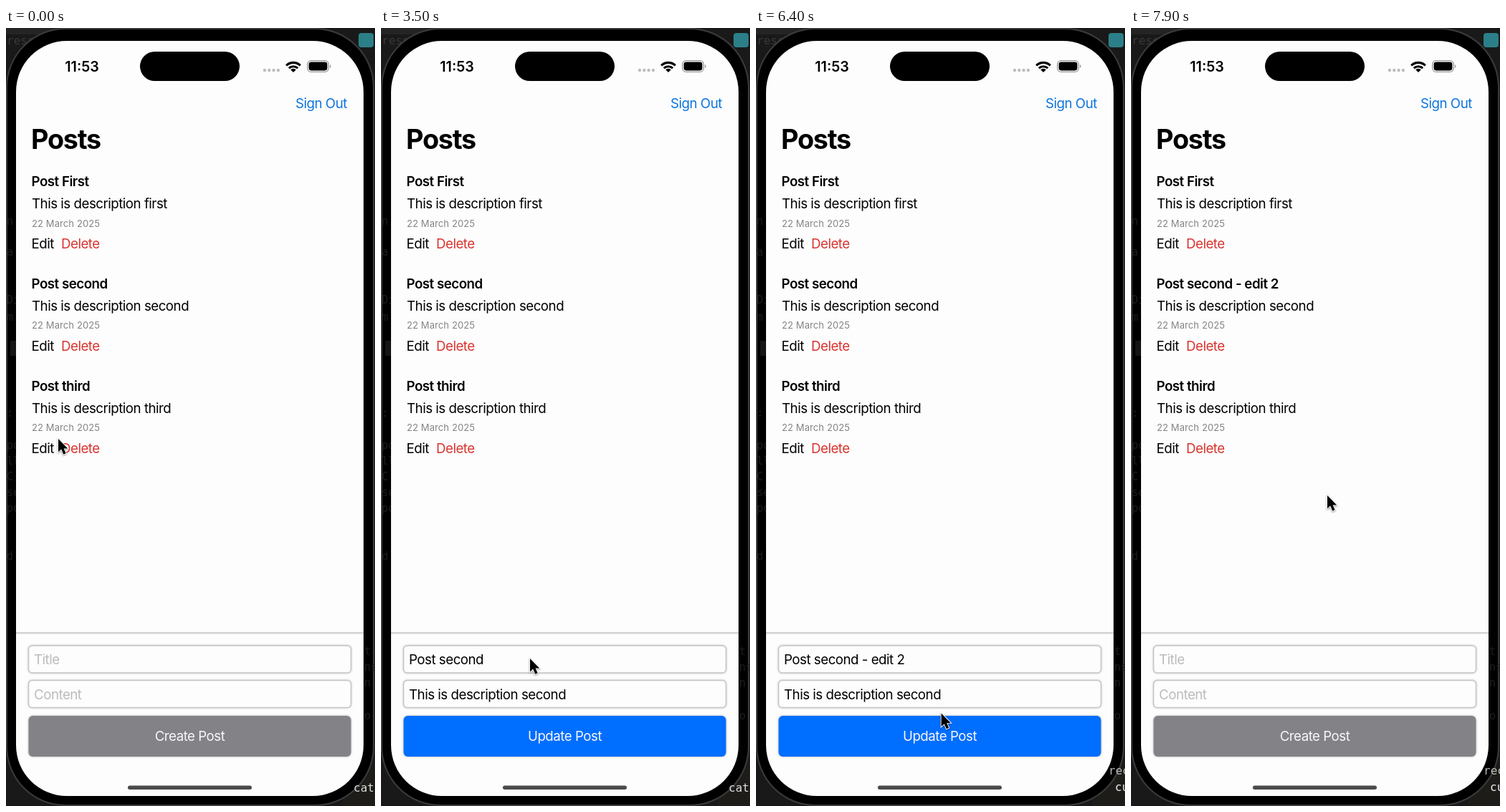
An HTML page that plays this animation: 515 px wide and 1087 px high, repeating every 8 s.

```html
<!DOCTYPE html>
<html lang="en">
<head>
<meta charset="utf-8">
<title>Posts</title>
<style>
  html, body { margin: 0; width: 100%; height: 100%; overflow: hidden; background: #161616; }
  svg { display: block; width: 100%; height: 100%; }
  text { font: 18.7px Inter, sans-serif; letter-spacing: -.026em; white-space: pre; }
  .title { font-weight: 600; }
  .date { font-size: 13px; letter-spacing: .1px; fill: #848486; }
  .red { fill: #d9342f; }
  .mono { font: 16px "DejaVu Sans Mono", monospace; letter-spacing: 0; }
  .dim { fill: #1d1d1d; font-size: 15px; }
  .mid { text-anchor: middle; }
  .field { fill: #fdfdfd; stroke: #c5c5c7; stroke-width: 1.5; filter: drop-shadow(0 0 1.5px #0003); }
</style>
</head>
<body>
<svg viewBox="0 0 515 1087">
  <!-- desktop behind the phone -->
  <rect width="515" height="1087" fill="#191919"/>
  <rect width="415" height="9" fill="#242424"/>
  <rect y="105" width="515" height="3" fill="#101010"/>
  <rect x="492" y="7" width="21" height="20" rx="4" fill="#2b7f88"/>
  <text class="mono" x="1" y="23" fill="#393939">rese</text>
  <rect x="470" y="1000" width="45" height="87" fill="#1d1c18"/>

  <!-- phone -->
  <rect x="1" y="1" width="512" height="1085" rx="82" stroke="#3b3b3d" stroke-width="2"/>
  <g id="backdrop"></g>
  <g id="consoleBefore" class="console">
    <text class="mono" x="485" y="1067" fill="#ddd">cated</text>
  </g>
  <g id="consoleAfter" class="console">
    <text class="mono" x="492" y="1043" fill="#bbb">rec</text>
    <text class="mono" x="501" y="1066" fill="#eee">cu</text>
  </g>
  <rect x="14" y="18" width="485" height="1055" rx="71" fill="#fdfdfd"/>
  <rect x="187" y="33" width="139" height="41" rx="20.5"/>

  <!-- status bar -->
  <text class="title mid" x="106" y="61" style="font-size:19.7px;letter-spacing:0">11:53</text>
  <path d="M361 59h19" stroke="#bdbdbf" stroke-width="4.4" stroke-linecap="round" stroke-dasharray="0 6.3"/>
  <g fill="none" stroke="#000" stroke-width="3.1">
    <path d="M391.2 52.4a14 14 0 0 1 19.6 0M394.8 56.2a9 9 0 0 1 12.4 0"/>
  </g>
  <path d="M401 62l-3.8-3.8a5.5 5.5 0 0 1 7.6 0z"/>
  <rect x="420.7" y="45.7" width="29.6" height="15.6" rx="5" fill="none" stroke="#999" stroke-width="1.3"/>
  <rect x="422.6" y="47.6" width="25.8" height="11.8" rx="3.3"/>
  <path d="M452 51v5a2.8 2.8 0 0 0 0-5z" fill="#999"/>

  <text x="404" y="112" fill="#0c74dc">Sign Out</text>
  <text x="35" y="169" style="font-size:37.7px;font-weight:700;letter-spacing:-1.2px">Posts</text>
  <g id="posts"></g>

  <!-- form -->
  <rect x="14" y="844" width="485" height="2.5" fill="#d3d3d5"/>
  <rect class="field" x="31.5" y="863" width="450" height="38" rx="5"/>
  <rect class="field" x="31.5" y="911.5" width="450" height="38" rx="5"/>
  <text id="titleField" x="39" y="889"></text>
  <text id="contentField" x="39" y="938"></text>
  <rect id="caret" y="870.5" width="2.2" height="23" fill="#1672d2"/>
  <rect id="button" x="31.5" y="961" width="450" height="57" rx="6" style="filter:drop-shadow(0 0 1.5px #0005)"/>
  <text id="label" class="mid" x="256.5" y="996"></text>
  <rect x="170" y="1058.5" width="173" height="5.5" rx="2.7" fill="#4b4b4d"/>

  <path id="pointer" d="M0 0V18.5L4.2 14.6L7.2 21.8L10.6 20.3L7.6 13.4H13.2Z" stroke="#fff" stroke-width="1.8"
        paint-order="stroke" style="filter:drop-shadow(0 1px 1px #0006)"/>
</svg>
<script>
const LOOP = 8000, STEP = 100;
const PRESS = 7000, SAVED = 7300, LISTED = 7500, OPENED = 2000;
const el = id => document.getElementById(id);
const POST = 'Post second', BODY = 'This is description second';

// time, x, y of the pointer tip
const path = [
  [0, 73, 574], [400, 61, 582], [500, 61, 582], [1300, 95, 470], [1400, 95, 470],
  [1800, 57, 447], [2100, 57, 447], [2800, 165, 760], [3500, 208, 881],
  [5900, 208, 881], [6700, 282, 993], [7200, 282, 993], [7700, 274, 653], [LOOP, 274, 653]
];
// moment at which each added character is typed
const suffix = ' - edit 2';
const keyTimes = [4200, 4500, 4700, 4800, 4900, 5000, 5100, 5200, 5700];

el('posts').innerHTML = ['First', 'second', 'third'].map((name, i) => `
  <g transform="translate(0 ${i * 142.8})">
    <text class="title" id="post${i}" x="35.5" y="221">Post ${name}</text>
    <text x="36" y="252">This is description ${name.toLowerCase()}</text>
    <text class="date" x="36" y="277.7">22 March 2025</text>
    <text x="35.5" y="308">Edit</text>
    <text class="red" x="77" y="308">Delete</text>
  </g>`).join('');

const dimText = (x, lines) => lines.map(([y, s]) =>
  `<text class="mono dim" x="${x}" y="${y}">${s}</text>`).join('');
el('backdrop').innerHTML =
  dimText(1, [[275, 'n'], [318, 'a'], [385, 'Di'], [409, 'm'], [543, ':'], [588, 'po'],
    [610, 'll'], [632, 'C'], [654, 'se'], [676, 'po'], [743, 'd']]) +
  dimText(500, [[876, 't'], [898, 'ns'], [920, 'n'], [966, 'o']]) +
  '<rect x="6" y="437" width="8" height="21" fill="#151515"/>';

const ease = p => p * p * (3 - 2 * p);
const mix = (a, b, p) => a + (b - a) * p;

function pointerAt(t) {
  const i = path.findIndex(k => k[0] > t);
  const [t0, x0, y0] = path[i - 1], [t1, x1, y1] = path[i];
  const p = ease((t - t0) / (t1 - t0));
  return [mix(x0, x1, p), mix(y0, y1, p)];
}

function show(id, visible) {
  el(id).style.display = visible ? '' : 'none';
}

function setField(id, value, placeholder) {
  el(id).textContent = value || placeholder;
  el(id).setAttribute('fill', value ? '#000' : '#bbbbbd');
}

function render(t) {
  const editing = t >= OPENED && t < SAVED;
  const typed = suffix.slice(0, keyTimes.filter(k => k <= t).length);
  setField('titleField', editing && POST + typed, 'Title');
  setField('contentField', editing && BODY, 'Content');

  const typing = t >= 4200 && t < 5800;
  const focused = t >= 3700 && t < PRESS;
  show('caret', focused && (typing || t % 1000 >= 500));
  el('caret').setAttribute('x', 40 + el('titleField').getComputedTextLength());

  const pressed = Math.max(0, Math.min(1, (t - PRESS) / 100));
  const blue = [[0, 176], [110, 205], [255, 230]].map(([a, b]) => mix(a, b, pressed));
  el('button').setAttribute('fill', editing ? `rgb(${blue})` : '#838287');
  el('label').textContent = editing ? 'Update Post' : 'Create Post';
  el('label').setAttribute('fill', editing && pressed ? '#a2c1df' : '#f8f8fa');

  el('post1').textContent = POST + (t >= LISTED ? suffix : '');
  show('consoleBefore', t < 3800);
  show('consoleAfter', t >= 3800);
  el('pointer').setAttribute('transform', `translate(${pointerAt(t)})`);
}

const start = performance.now();
function tick() {
  const t = (performance.now() - start) % LOOP;
  render(Math.floor(t / STEP) * STEP);
  requestAnimationFrame(tick);
}
tick();
</script>
</body>
</html>
```
